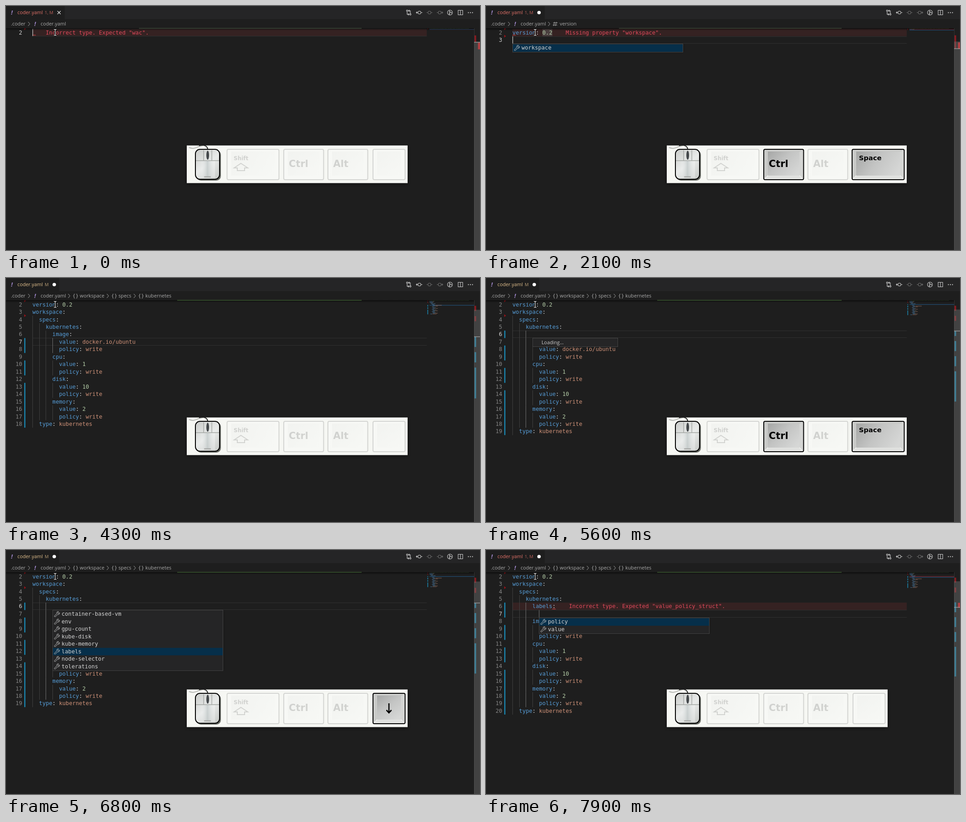
Recreate the animation shown at these times as an HTML page with a canvas. Size 1041x538 px, loop 8 s.

```html
<!DOCTYPE html>
<html lang="en">
<head>
<meta charset="utf-8">
<title>YAML completion</title>
<style>
html, body { margin: 0; width: 100%; height: 100%; overflow: hidden; background: #1e1e1e; }
canvas { display: block; }
</style>
</head>
<body>
<canvas id="stage" width="1041" height="538"></canvas>
<script>
const g = document.getElementById('stage').getContext('2d');
const LOOP = 8000, CW = 7.31, LH = 16.46, X0 = 58;
const MONO = '12.14px "DejaVu Sans Mono", monospace';
const UI = '10.8px "Open Sans", sans-serif';
const SMALL = '9.5px "Open Sans", sans-serif';
const BOLD = px => `bold ${px}px "DejaVu Sans", sans-serif`;
const KEY = '#569cd6', PLAIN = '#d4d4d4', STR = '#ce9178', NUM = '#b5cea8';
const CYAN = '#1b81a8', GREEN = '#587c0c', RED = '#94151b';

// Document states; the first entry is line 2.
const block = (name, value) => [`      ${name}:`, `        value: ${value}`, '        policy: write'];
const head = ['version: 0.2', 'workspace:', '  specs:', '    kubernetes:'];
const body = [...block('image', 'docker.io/ubuntu'), ...block('cpu', 1),
  ...block('disk', 10), ...block('memory', 2), '  type: kubernetes'];
const specs = ['version: 0.2', 'workspace:', '  specs:', '', '  type: kubernetes'];

const loading = (line, col) => ({ line, col });
const list = (line, col, items, sel = 0) => ({ line, col, items, sel });
const kube = ['container-based-vm', 'env', 'gpu-count', 'kube-disk',
  'kube-memory', 'labels', 'node-selector', 'tolerations'];
const choose = i => ({ pop: list(6, 6, kube, i) });
const shifted = d => [[7 + d, 2], [10 + d, 2], [13 + d, 6]];
const wrong = 'Incorrect type. Expected ';

// Each event changes part of the state; "tick" restarts the caret blink.
const events = [
  [0, { doc: [''], line: 2, col: 0, tick: 0, err: [2, 0, wrong + '"wac".'], keys: '', git: [], dels: [1], crumbs: [] }],
  [200, { keys: 'C' }],
  [400, { pop: loading(2, 0) }],
  [500, { pop: list(2, 0, ['version', 'workspace']) }],
  [600, { keys: '' }],
  [1000, { pop: null, keys: 'E', doc: ['version: 0.2'], plain: true, col: 12, tick: 1000,
    mark: [2, 9, 12, '#45617a'], err: [2, 12, wrong + '"wac".'] }],
  [1200, { dirty: true }],
  [1300, { plain: false, err: [2, 0, 'Missing property "workspace".'] }],
  [1500, { keys: '', mark: [2, 9, 12, '#4b4040'] }],
  [1600, { keys: 'E', doc: ['version: 0.2', ''], line: 3, col: 0, tick: 1700 }],
  [1700, { crumbs: ['version'], dels: [1, 2] }],
  [1800, { keys: '' }],
  [1900, { keys: 'C' }],
  [2000, { pop: loading(3, 0) }],
  [2100, { pop: list(3, 0, ['workspace']) }],
  [2300, { keys: '' }],
  [2400, { keys: 'E' }],
  [2500, { pop: null, doc: specs, line: 5, col: 4, tick: 2600, mark: [6, 8, 18, '#474341', true] }],
  [2800, { keys: '', git: [[5, 1], [6, 1, GREEN]], dels: [1, 3] }],
  [2900, { crumbs: ['workspace'] }],
  [3000, { err: null }],
  [3100, { dim: true }],
  [3200, { keys: 'C' }],
  [3300, { pop: loading(5, 4) }],
  [3400, { pop: list(5, 4, ['kubernetes']) }],
  [3600, { keys: '', dim: false }],
  [3700, { keys: 'E' }],
  [3800, { pop: null, mark: null, doc: [...head, ...body], line: 7, col: 31, tick: 3800 }],
  [3900, { keys: '' }],
  [4100, { git: shifted(0) }],
  [4300, { crumbs: ['workspace', 'specs', 'kubernetes'] }],
  [4500, { keys: 'U', line: 6, col: 12, tick: 4500 }],
  [4600, { line: 5, col: 15, tick: 4600 }],
  [4700, { keys: '', tick: 4700 }],
  [4900, { keys: 'E' }],
  [5000, { doc: [...head, '', ...body], line: 6, col: 6, tick: 5100, git: shifted(1) }],
  [5100, { keys: '' }],
  [5300, { keys: 'C', git: [[6, 1], ...shifted(1)] }],
  [5400, { pop: loading(6, 6) }],
  [5900, { keys: '', ...choose(0) }],
  [6000, { keys: 'D', ...choose(1) }],
  [6100, choose(2)],
  [6200, choose(3)],
  [6500, choose(4)],
  [6600, choose(5)],
  [7100, { keys: 'E' }],
  [7200, { pop: null, doc: [...head, '      labels:', '', ...body], line: 7, col: 8, tick: 7300, git: [[6, 1], ...shifted(2)] }],
  [7400, { git: [[6, 2], ...shifted(2)] }],
  [7600, { err: [6, 12, wrong + '"value_policy_struct".'] }],
  [7800, { pop: list(7, 8, ['policy', 'value']), dim: true }],
  [7900, { keys: '' }]
];

const stateAt = t => Object.assign({}, ...events.filter(e => e[0] <= t).map(e => e[1]));
const mid = n => 58.3 + (n - 2) * LH;
const colX = c => X0 + c * CW;

function rect(x, y, w, h, color) {
  g.fillStyle = color;
  g.fillRect(x, y, w, h);
}
function text(s, x, y, color, font = MONO, align = 'left') {
  g.font = font;
  g.textAlign = align;
  g.fillStyle = color;
  g.fillText(s, x, y);
}
function path(d, color, width = 1, fill) {
  const p = new Path2D(d);
  if (fill) { g.fillStyle = fill; g.fill(p); }
  if (color) { g.strokeStyle = color; g.lineWidth = width; g.stroke(p); }
}
function round(x, y, w, h, r, fill, stroke, width = 1) {
  g.beginPath();
  g.roundRect(x, y, w, h, r);
  if (fill) { g.fillStyle = fill; g.fill(); }
  if (stroke) { g.strokeStyle = stroke; g.lineWidth = width; g.stroke(); }
}
function circle(x, y, r, stroke, fill) {
  g.beginPath();
  g.arc(x, y, r, 0, 7);
  if (fill) { g.fillStyle = fill; g.fill(); }
  if (stroke) { g.strokeStyle = stroke; g.lineWidth = 1.1; g.stroke(); }
}
function fade(x, y, x2, y2, ...colors) {
  const f = g.createLinearGradient(x, y, x2, y2);
  colors.forEach((c, i) => f.addColorStop(i / (colors.length - 1), c));
  return f;
}

function tokens(s) {
  const m = s.match(/^(\s*)(\w+):(?: (.*))?$/);
  if (!m) return [];
  const at = m[1].length, end = at + m[2].length;
  const out = [[at, m[2], KEY], [end, ':', PLAIN]];
  if (m[3]) out.push([end + 2, m[3], isNaN(m[3]) ? STR : NUM]);
  return out;
}

function indents(doc) {
  const own = doc.map(s => s ? s.search(/\S/) : -1);
  return own.map((v, i) => {
    if (v >= 0) return v;
    const up = own[i - 1] ?? 0, down = own[i + 1] ?? 0;
    return up < down ? up + 2 : Math.min(up, down);
  });
}

function guides(s) {
  const ind = indents(s.doc), a = s.line - 2, on = ind[a] - 2;
  let from = a, to = a;
  while (ind[from - 1] > on) from--;
  while (ind[to + 1] > on) to++;
  ind.forEach((v, i) => {
    for (let c = 0; c < v; c += 2) {
      const lit = c === on && i >= from && i <= to;
      rect(Math.round(colX(c)), mid(i + 2) - LH / 2, 1, LH + .2, lit ? '#707070' : '#404040');
    }
  });
}

function editor(s, t) {
  const top = mid(s.line) - LH / 2;
  if (s.err) rect(X0, mid(s.err[0]) - LH / 2, 866, LH, '#352222');
  rect(X0, Math.round(top), 866, 1, '#303030');
  rect(X0, Math.round(top + LH) - 1, 866, 1, '#303030');
  guides(s);
  if (s.mark) {
    const [n, a, b, color, stop] = s.mark;
    rect(colX(a), mid(n) - 8, (b - a) * CW, 16, color);
    if (stop) rect(colX(b), mid(n) - 8, 1, 16, '#8a8a8a');
  }
  s.doc.forEach((row, i) => {
    const n = i + 2, y = mid(n) + 4.3;
    text(n, 35.5, y, n === s.line ? '#d0d0d0' : '#858585', MONO, 'right');
    for (const [c, word, color] of tokens(row)) text(word, colX(c), y, s.plain ? PLAIN : color);
  });
  for (const [n, count, color = CYAN] of s.git) rect(40, mid(n) - 8.2, 2.6, count * LH, color);
  for (const n of s.dels) {
    const y = mid(n) + 8.3;
    path(`M40 ${y - 3}l4 3l-4 3z`, null, 0, RED);
  }
  if (s.err) {
    const [n, c, msg] = s.err, x = colX(c), y = mid(n) + 7;
    text(msg, colX(s.doc[n - 2].length + 4), mid(n) + 4.3, '#e0495b');
    path(`M${x} ${y}l1.8 -2l1.8 2l1.8 -2l1.8 2`, '#f14c4c');
  }
  const lit = (t - s.tick) % 1000 < 500;
  if (lit || s.dim) rect(Math.round(colX(s.col)), top + .3, 1.3, LH - .6, lit ? '#c4c4c2' : '#686868');
}

function minimap(s) {
  const y = n => 47.6 + n * 1.73, x = c => 930 + c * .87;
  if (s.err) rect(930, y(s.err[0]) - .3, 98, 1.6, '#6b2024');
  rect(930, y(s.line) - .2, 98, 1.3, '#204c70');
  for (let i = 0; i < 24; i++) rect(930 + i * 3.65, y(1) - .7, 2.4 + (i * 7 % 5) * .25, 1.1, '#4b6b40');
  g.globalAlpha = .55;
  s.doc.forEach((row, i) => tokens(row).forEach(([c, word, color]) =>
    rect(x(c), y(i + 2), word.length * .87, 1, color)));
  g.globalAlpha = 1;
  for (const [n, count, color = CYAN] of s.git) rect(925.5, y(n) - .3, 1.6, count * 1.73, color);
  for (const n of s.dels) rect(925.5, y(n) + .3, 1.6, 1.5, RED);
}

function scrollbar(s) {
  const total = s.doc.length + 1, pitch = 15.3 - .22 * total;
  const y = n => 50 + n * pitch, top = 80 - .55 * total;
  rect(1028, 49, 1, 489, '#333');
  for (const n of s.dels) rect(1029, y(n), 3.5, pitch, '#8a1a20');
  for (const [n, count, color = CYAN] of s.git) rect(1029, y(n), 3.5, count * pitch, color);
  if (s.err) rect(1036.5, y(s.err[0]) + 1, 4.5, pitch, '#d81a20');
  rect(1028, top, 13, 538 - top, 'rgba(121,121,121,.4)');
  rect(1028, y(s.line) - .5, 13, 1.3, '#a0a0a0');
}

function bang(x, y) {
  text('!', x, y, '#a48bd0', 'italic bold 13px "Open Sans", sans-serif');
}

function header(s) {
  rect(0, 0, 1041, 29, '#252526');
  const width = s.err ? 129 : 117, color = s.err ? '#e5736a' : '#e2c08d';
  rect(0, 0, width, 29, '#1e1e1e');
  bang(11, 19);
  text('coder.yaml', 25, 18.3, color, UI);
  g.globalAlpha = .8;
  text(s.err ? '1, M' : 'M', 85, 18.3, color, SMALL);
  g.globalAlpha = 1;
  const x = width - 12.5 + (s.err ? 0 : 1.5);
  if (s.dirty) circle(x, 14.5, 3.8, null, '#fff');
  else path(`M${x - 3.5} 11l7 7m0 -7l-7 7`, '#e8e8e8', 1.2);

  rect(0, 29, 1041, 20, '#1e1e1e');
  rect(0, 49, 1028, 5, fade(0, 49, 0, 54, 'rgba(0,0,0,.55)', 'rgba(0,0,0,0)'));
  const from = s.crumbs.length > 1 ? 376 : 292;
  rect(from, 48.6, 781 - from, 1.1, s.err && from < 300 ? '#485640' : '#486f38');

  const grey = '#a9a9a9';
  const chevron = cx => path(`M${cx - 2} 35l4 4.5l-4 4.5`, grey);
  text('.coder', 11, 43, grey, UI);
  chevron(50.5);
  bang(62, 44);
  text('coder.yaml', 76, 43, grey, UI);
  let cx = 138.5;
  for (const name of s.crumbs) {
    chevron(cx);
    if (name === 'version') path(`M${cx + 9} 37h10m-11 5h10m-6 -7l-2 9m6 -9l-2 9`, grey);
    else text('{}', cx + 7.5, 42.7, grey, '10.5px "DejaVu Sans", sans-serif');
    text(name, cx + 23.5, 43, grey, UI);
    cx += 31 + g.measureText(name).width;
  }
  toolbar();
}

function toolbar() {
  const c = '#d0d0d0', dim = '#6c6c6c';
  circle(881, 10.5, 1.6, c);
  circle(888, 18.5, 1.6, c);
  path('M881 12.5v6h4m-2 -2l2 2l-2 2M888 16.5v-6h-4m2 -2l-2 2l2 2', c, 1.1);
  const commit = (x, color, d) => { circle(x, 14.5, 3.2, color); path(d, color, 1.2); };
  commit(908, c, 'M901 14.5h3.7m6.6 0h3.2M903 12.5l-2 2l2 2');
  commit(930, dim, 'M923.5 14.5h3.3m6.4 0h3.3');
  commit(952.5, dim, 'M946 14.5h3.3m6.4 0h3.7m-2 -2l2 2l-2 2');
  circle(975, 14.5, 5.5, c);
  path('M974 9v11M974 12l4 3', c, 1.1);
  circle(974, 17, 1, null, c);
  circle(978, 15, 1, null, c);
  path('M993 9.5h10v10h-10zM998 9.5v10', c, 1.1);
  for (const x of [1015.5, 1020, 1024.5]) circle(x, 14.7, 1.1, null, c);
}

function wrench(x, y) {
  path(`M${x - 5} ${y + 3.6}l5 -4.8c-1 -3 1 -5.2 4 -4.4l-2 2.2l.4 1.6l1.6 .4l2 -2.1c.8 3.2 -1.6 5 -4.2 4.2l-4.9 4.9c-1.2 1 -3 -.8 -1.9 -2z`, '#c8c8c8', 1);
}

function popup({ line, col, items, sel }) {
  const x = Math.round(colX(col)) + .5, y = Math.round(mid(line) + 8.2) + .5;
  const w = items ? 374 : 187, h = items ? items.length * LH + 2 : 19;
  g.shadowColor = 'rgba(0,0,0,.4)';
  g.shadowBlur = 5;
  rect(x, y, w, h, '#252526');
  g.shadowBlur = 0;
  if (items) rect(x, y + 1 + sel * LH, w, LH, '#062f4a');
  g.strokeStyle = '#454545';
  g.lineWidth = 1;
  g.strokeRect(x, y, w, h);
  if (!items) return text('Loading...', x + 19.5, y + 13.8, '#cccccc', UI);
  items.forEach((name, i) => {
    const cy = y + 9 + i * LH;
    wrench(x + 9, cy);
    text(name, x + 19.5, cy + 3.8, PLAIN);
  });
}

function mouse() {
  path('M402 312C416 318 420 308 432 308', '#b8bab6', 2);
  path('M424 308C436 305 443 309 443 317', '#222', 2);
  round(418, 318, 54, 67, 10, '#6b6e68');
  round(416, 316, 53, 66, 10, fade(416, 316, 469, 382, '#c9cbc9', '#e9ebea', '#c6c9c6'), '#000', 2);
  rect(426, 342, 33, 36, fade(426, 0, 459, 0, 'rgba(255,255,255,0)', 'rgba(190,198,198,.7)', 'rgba(255,255,255,.3)'));
  path('M417 341h51M434 318v23M452 318v23', '#a3a6a3', 1.4);
  g.beginPath();
  g.ellipse(443, 329, 3, 10, 0, 0, 7);
  g.fillStyle = '#43474a';
  g.fill();
  round(435, 375.5, 15, 2.5, 1, '#a8aaa8');
}

function keycap(x, w, on, label) {
  g.globalAlpha = on ? 1 : .14;
  const y = 316, h = 67;
  round(x + 1, y, w - 2, h, 3, on ? '#c9cac8' : '#fff');
  if (on) {
    path(`M${x + 2} ${y + h - 1}l9 -9h${w - 22}l9 9z`, null, 0, '#e0e1df');
    path(`M${x + w - 2} ${y + 1}l-9 5v52l9 8z`, null, 0, '#d4d5d3');
    path(`M${x + 2} ${y + h - 1}l9 -9M${x + w - 2} ${y + h - 1}l-9 -9`, '#f2f2f0', 1.5);
  }
  rect(x + 10, y + 5, w - 20, 53, on
    ? fade(x + 10, y, x + w - 20, y + 58, '#a3a4a3', '#c3c4c3', '#d6d7d6')
    : fade(x + 10, y, x + w - 20, y + 58, '#d0d2cf', '#f4f6f3'));
  round(x + 1, y, w - 2, h, 3, null, '#000', 2);
  if (label) label();
  g.globalAlpha = 1;
}

function keyboard(keys) {
  const wide = keys === 'C' || keys === 'E', w = wide ? 527 : 485;
  g.shadowColor = 'rgba(0,0,0,.45)';
  g.shadowBlur = 8;
  g.shadowOffsetY = 2;
  rect(397, 307.5, w, 83, '#f6f7f3');
  g.shadowBlur = g.shadowOffsetY = 0;
  g.shadowColor = 'transparent';
  mouse();
  keycap(484.5, 116, false, () => {
    text('Shift', 500, 340, '#000', BOLD(12));
    path('M516 347l15 10h-7v6h-16v-6h-7z', '#000', 2);
  });
  keycap(609, 89.5, keys === 'C', () => text('Ctrl', 621, 355, '#000', BOLD(21)));
  keycap(706, 89.5, false, () => text('Alt', 718.5, 355, '#000', BOLD(21)));
  if (wide) keycap(803, 116.5, true, () => {
    text(keys === 'C' ? 'Space' : 'Enter', 819, 340, '#000', BOLD(14.7));
    if (keys === 'E') path('M820 355.5l9 -5.5v3.5h13v-7h6v12h-19v3.5z', '#000', 1.5);
  });
  else keycap(805, 72.5, !!keys, () => {
    if (keys === 'D') path('M841 338v20M835.5 353l5.5 6l5.5 -6', '#000', 2.6);
    if (keys === 'U') path('M841 360v-20M835.5 345l5.5 -6l5.5 6', '#000', 2.6);
  });
}

function pointer() {
  const d = 'M105 51.5h2l1 1l1 -1h2M108 52.5v11.5M105 65h2l1 -1l1 1h2';
  path(d, '#000', 3);
  path(d, '#fff', 1.2);
}

function draw() {
  const t = performance.now() % LOOP, s = stateAt(t);
  rect(0, 0, 1041, 538, '#1e1e1e');
  editor(s, t);
  minimap(s);
  scrollbar(s);
  header(s);
  if (s.pop) popup(s.pop);
  keyboard(s.keys);
  pointer();
  requestAnimationFrame(draw);
}
draw();
</script>
</body>
</html>
```
